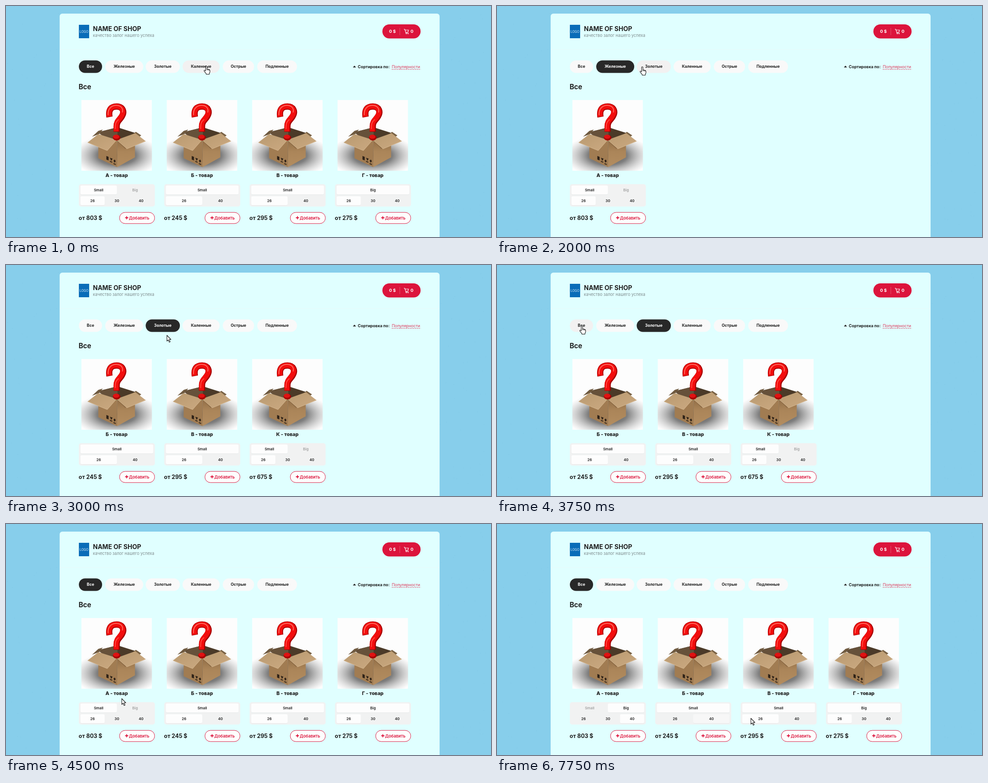
Recreate the animation shown at these times as an HTML page. Size 1085x516 px, loop 8 s.

```html
<!DOCTYPE html>
<html lang="ru">
<head>
<meta charset="utf-8">
<title>Shop</title>
<style>
html, body { margin: 0; width: 100%; height: 100%; overflow: hidden; background: #87ceeb; }
svg { display: block; width: 1085px; height: 516px; }
text { font-family: Inter, "Open Sans", sans-serif; fill: #202020; white-space: pre; }
.mid { text-anchor: middle; }
.b { font-weight: 700; }
</style>
</head>
<body>
<svg viewBox="0 0 1085 516">
  <defs>
    <radialGradient id="shade">
      <stop offset="0" stop-color="#3c3c3c"/>
      <stop offset=".45" stop-color="#6a6a6a" stop-opacity=".85"/>
      <stop offset="1" stop-color="#b5b5b5" stop-opacity="0"/>
    </radialGradient>
    <linearGradient id="flap" x2="1" y2="1">
      <stop offset="0" stop-color="#b99a70"/><stop offset="1" stop-color="#cba981"/>
    </linearGradient>
    <linearGradient id="side" y2="1" x2="0">
      <stop offset="0" stop-color="#86643f"/><stop offset=".5" stop-color="#ab8559"/><stop offset="1" stop-color="#b38d60"/>
    </linearGradient>
    <symbol id="box" viewBox="0 0 158 158" width="158" height="158">
      <rect width="158" height="158" fill="#fdfdfd"/>
      <ellipse cx="79" cy="124" rx="98" ry="48" fill="url(#shade)"/>
      <path d="M37 72L81 61L122 74L79 92Z" fill="#4b3a28"/>
      <path d="M37 72L81 61V84L60 90Z" fill="#66513a"/>
      <path d="M24 82L38 69L48 66L40 76Z" fill="#6f5a40"/>
      <path d="M122 71L134 79L129 83L116 76Z" fill="#7a6346"/>
      <path d="M38 80V130L80 150V90Z" fill="#a17c52"/>
      <path d="M80 90V150L120 128V80Z" fill="url(#side)"/>
      <path d="M79 90L98 109L120 100V80Z" fill="#7d5c39" opacity=".6"/>
      <path d="M38 76L79 89L58 113L14 95Z" fill="url(#flap)"/>
      <path d="M79 89L121 74L144 92L102 109Z" fill="url(#flap)"/>
      <path d="M14 95L58 113L79 89L102 109L144 92" fill="none" stroke="#dcc09a" stroke-width=".8"/>
      <g fill="#2d2117">
        <path d="M56 125l5 2v8l-5-2zM64 129l6 2-3 5zM64 136l5 2v2l-5-2zM72 135l3-2 2 4-3 3zM72 141l5 2v2l-5-2z"/>
      </g>
      <ellipse cx="79" cy="84" rx="8.5" ry="6.5" fill="#a50000"/>
      <ellipse cx="78" cy="82" rx="7" ry="4.5" fill="#e01212"/>
      <g fill="none">
        <path id="hook" d="M63 38C60 20 68 14.5 79 14.5C93 14.5 97 26 91 36C86 45 79 47 79 59V71" stroke="#a80000" stroke-width="14"/>
        <path d="M62.500 37C60 20 68 14 78.500 14C92 14 96 26 90 35C85 44 78 46 78 58V70" stroke="#f20d0d" stroke-width="11"/>
        <path d="M60 33C59 19 68 12 78 12C88 12 94 18 92 27" stroke="#ff6a5e" stroke-width="2" stroke-linecap="round"/>
        <path d="M83 44C77 49 76 52 76 64" stroke="#ff4a40" stroke-width="2" stroke-linecap="round"/>
      </g>
    </symbol>
  </defs>
  <g id="base"></g>
  <g id="live"></g>
</svg>
<script>
const STEP = 250, LOOP = 8000;
const RED = '#dc143c', DARK = '#282828', GREY = '#f3f3f3';

const rect = (x, y, w, h, r, fill, more = '') =>
  `<rect x="${x}" y="${y}" width="${w}" height="${h}" rx="${r}" fill="${fill}" ${more}/>`;
const text = (x, y, size, str, cls = 'b', more = '') =>
  `<text x="${x}" y="${y}" font-size="${size}" class="${cls}" ${more}>${str}</text>`;

const PILLS = [['Все', 163, 215], ['Железные', 222, 307], ['Золотые', 312.5, 389],
  ['Каленные', 395, 478], ['Острые', 485, 555], ['Подленные', 562, 651]];

// name, sizes, lengths, price
const A = ['А', ['Small', 'Big'], [26, 30, 40], 803];
const B = ['Б', ['Small'], [26, 40], 245];
const V = ['В', ['Small'], [26, 40], 295];
const G = ['Г', ['Big'], [26, 30, 40], 275];
const K = ['К', ['Small', 'Big'], [26, 30, 40], 675];

// step, kind (hand or arrow), hot spot
const CURSOR = [
  [0, 'hand', 448, 134], [1, 'arrow', 440, 190], [2, 'arrow', 402, 255], [3, 'arrow', 352, 228],
  [4, 'arrow', 314, 178], [5, 'hand', 295, 138], [8, 'hand', 325, 136], [9, 'hand', 344, 134],
  [11, 'hand', 347, 136], [12, 'arrow', 360, 157], [13, 'arrow', 328, 155], [14, 'hand', 262, 140],
  [15, 'hand', 190, 136], [16, 'arrow', 208, 177], [17, 'arrow', 236, 300], [18, 'arrow', 259, 390],
  [19, 'hand', 280, 404], [20, 'hand', 288, 407], [22, 'hand', 291, 416], [23, 'hand', 300, 431],
  [25, 'hand', 302, 434], [26, 'arrow', 343, 433], [27, 'hand', 392, 434], [28, 'hand', 446, 433],
  [29, 'hand', 474, 433], [30, 'hand', 480, 434], [31, 'arrow', 568, 434]
];
const SHAPES = {
  hand: 'M-1.5 9.500V1.300a1.500 1.500 0 0 1 3 0V6.500l4.800 1.200q1.900.5 1.900 2.500v3l-1.400 3.800v1.500h-7v-1.700l-4.300-5q-1-1.600.4-2.200q1-.3 2.600 1.500zM1.500 6.500V9.500M4 7.200V9.800M6.300 7.800V10',
  arrow: 'M0 0V13L3 10.300L5.200 15.500L7.400 14.600L5.200 9.500H9Z'
};

function specks() {
  let seed = 7, out = '';
  const rnd = () => (seed = seed * 16807 % 2147483647) / 2147483647;
  for (let i = 0; i < 90; i++) {
    const x = rnd() * 235, y = rnd() * 516;
    out += rect((x < 118 ? x : x + 852).toFixed(1), y.toFixed(1), 1, 1, 0, '#79bfe0', 'opacity=".7"');
  }
  return out;
}

function page() {
  const cart = '<path d="M890 52h2.200l2 6.500h5l1.300-4.800h-8.600M895.200 58.500l-.8 2h6" fill="none" stroke="#fff" stroke-width="1.100"/>' +
    '<circle cx="895.500" cy="62" r="1" fill="#fff"/><circle cx="899.500" cy="62" r="1" fill="#fff"/>';
  return specks() +
    rect(120, 17, 850, 520, 6, '#e0ffff') +
    rect(120, 97, 850, 1, 0, '#e7fbfb') +
    rect(163, 42, 23, 30, 0, '#0a6cb8') +
    text(174.5, 60, 7, 'LOGO', 'mid', 'style="fill:#e6f2fb"') +
    text(194.5, 55.5, 14, 'NAME OF SHOP') +
    text(194.5, 69, 9.2, 'качество залог нашего успеха', '', 'style="fill:#7f8b8d"') +
    rect(842, 41, 85.5, 31.5, 15.7, RED) +
    text(857, 60, 9.5, '0 $', 'b', 'style="fill:#fff"') +
    rect(880.5, 49, 1, 16, 0, '#e5526f') + cart +
    text(905, 60, 9.5, '0', 'b', 'style="fill:#fff"') +
    '<path d="M776 137.300L779.500 133.200L783 137.300Z" fill="#202020"/>' +
    text(787, 138.5, 9, 'Сортировка по:') +
    text(863, 138.5, 9.05, 'Популярности', '', `style="fill:${RED}" opacity=".85"`) +
    `<path d="M863 141.500H927.500" stroke="${RED}" stroke-dasharray="2.500 1.500" opacity=".85"/>` +
    text(162.5, 185.5, 15.3, 'Все');
}

function pills(step, cur) {
  const active = step < 8 ? 0 : step < 12 ? 1 : step < 16 ? 2 : 0;
  const press = step === 7 || step === 11;
  const half = step === 16;
  return PILLS.map(([label, x0, x1], i) => {
    const hover = cur[1] === 'hand' && cur[2] > x0 && cur[2] < x1 && cur[3] > 121 && cur[3] < 150;
    let fill = hover ? '#f2f1f1' : '#f9f9f9', ink = '#202020';
    if (i === active) { fill = DARK; ink = press ? '#1d1d1d' : '#fff'; }
    if (press && i === active + 1) ink = '#fafafa';
    if (half && (i === 0 || i === 2)) fill = '#8a8a8a';
    return rect(x0, 121.5, x1 - x0, 28, 14, fill) +
      text((x0 + x1) / 2, 138.4, 8.9, label, 'b mid', `style="fill:${ink}"`);
  }).join('');
}

// one row of choices with a white tile under the chosen one
function row(items, y, chosen, dim, tile = '#fdfdfd') {
  const w = 163 / items.length;
  return items.map((it, i) => {
    const on = i === chosen, x = 3.5 + w * i;
    return (on ? rect(x, y + .8, w, 20, 3, '#e3e6e6') + rect(x, y, w, 20, 3, tile) : '') +
      text(x + w / 2, y + 12.9, 8, it, 'mid', `font-weight="600" style="fill:${!on && dim ? '#a0a0a0' : '#202020'}"`);
  }).join('');
}

function card(item, i, step) {
  const [name, sizes, lengths, price] = item;
  const size = item === A && step >= 21 ? 1 : 0;
  const fading = item === B && step === 31;
  const length = item === A && step >= 24 ? 2 : fading ? 1 : 0;
  return `<g transform="translate(${163 + 191 * i})">` +
    '<use href="#box" x="5.500" y="210"/>' +
    text(84.5, 382, 10.9, name + ' - товар', 'mid', 'font-weight="800"') +
    rect(0, 398, 170, 50, 5, '#f1f2f2') +
    row(sizes, 401, size, true) +
    row(lengths, 425, length, false, fading ? '#f7f7f7' : undefined) +
    text(-.5, 478, 12.5, `от ${price} $`) +
    rect(91, 461, 78.5, 25, 12.5, '#fdfdfd', `stroke="${RED}"`) +
    `<path d="M103.500 473H110.500M107 469.500V476.500" stroke="${RED}" stroke-width="1.800"/>` +
    text(112, 476.8, 9.3, 'Добавить', '', `font-weight="600" style="fill:${RED}"`) +
    '</g>';
}

const skeleton = i => `<g transform="translate(${163 + 191 * i})">` +
  `<circle cx="80" cy="296" r="69.800" fill="${GREY}"/>` +
  rect(0, 376, 170, 15, 2, GREY) + rect(0, 399, 170, 50, 3, GREY) +
  rect(0, 464, 55, 18.5, 3, GREY) + rect(83, 458, 85, 28, 14, GREY) + '</g>';

function goods(step) {
  if (step === 16) return [0, 1, 2, 3].map(skeleton).join('');
  const list = step < 8 || step > 16 ? [A, B, V, G] : step < 12 ? [A] : [B, V, K];
  return list.map((item, i) => card(item, i, step)).join('');
}

const pointer = ([, kind, x, y]) =>
  `<path transform="translate(${x} ${y})" d="${SHAPES[kind]}" fill="#fff" stroke="#111" stroke-width="1.100" stroke-linejoin="round"/>`;

document.getElementById('base').innerHTML = page();
const live = document.getElementById('live');
const start = performance.now();
let shown = -1;

function tick() {
  const step = Math.floor((Math.max(0, performance.now() - start) % LOOP) / STEP);
  if (step !== shown) {
    shown = step;
    const cur = CURSOR.filter(c => c[0] <= step).pop();
    live.innerHTML = pills(step, cur) + goods(step) + pointer(cur);
  }
  requestAnimationFrame(tick);
}
tick();
</script>
</body>
</html>
```
